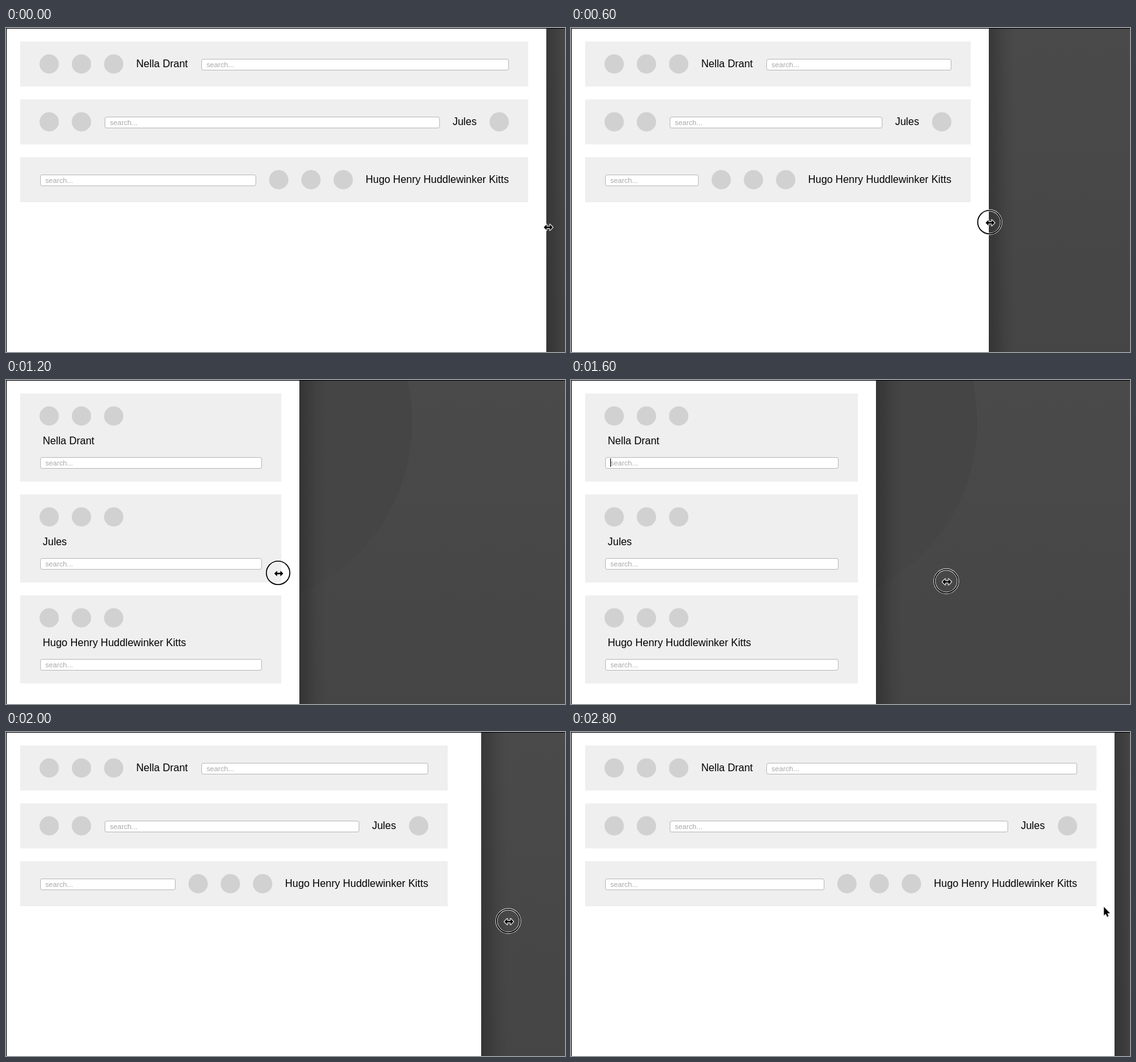
These frames come from a looping animation (867x504 px, 3 s). An HTML page:

```html
<!DOCTYPE html>
<html lang="en">
<head>
<meta charset="utf-8">
<title>Responsive toolbars</title>
<style>
  html, body { margin: 0; width: 100%; height: 100%; overflow: hidden; background: #484848; }
  svg { display: block; }
  .panel { fill: #efefef; }
  .dot { fill: #d1d1d1; }
  .field { fill: #fff; stroke: #bcbcbc; }
  .name { font: 16px "Liberation Sans", Arial, sans-serif; }
  .hint { font: 11.2px "Liberation Sans", Arial, sans-serif; fill: #a9a9a9; }
  .pointer { fill: #000; stroke: #fff; stroke-width: 2; paint-order: stroke; stroke-linejoin: round; }
  .ring { fill: none; stroke: #000; stroke-width: 1.6; }
  .halo { fill: none; stroke: #fff; stroke-width: 3.4; stroke-opacity: .8; }
</style>
</head>
<body>
<svg width="867" height="504" viewBox="0 0 867 504">
  <defs>
    <linearGradient id="desk" x2="0" y2="1">
      <stop stop-color="#4a4a4a"/><stop offset="1" stop-color="#454545"/>
    </linearGradient>
    <linearGradient id="shade">
      <stop stop-opacity=".24"/><stop offset=".3" stop-opacity=".16"/>
      <stop offset=".6" stop-opacity=".06"/><stop offset="1" stop-opacity="0"/>
    </linearGradient>
  </defs>
  <rect width="867" height="504" fill="url(#desk)"/>
  <circle cx="340" cy="66" r="290" fill="#454545"/>
  <rect id="shadow" width="42" height="504" fill="url(#shade)"/>
  <rect id="page" x="1" height="504" fill="#fff"/>
  <g id="panels"></g>
  <path d="M0 .5H867M.5 0V504" stroke="#000"/>
  <g id="cursor"></g>
</svg>
<script>
const STEP = 200, LOOP = 3000, NARROW = 500;
const NAMES = ['Nella Drant', 'Jules', 'Hugo Henry Huddlewinker Kitts'];

// Each step: window edge, cursor x, cursor y, how far the panels lag behind the edge
const STEPS = [
  [838, 840, 309], [838, 840, 309], [838, 829, 307], [648, 649, 302], [647, 646, 302],
  [645, 631, 301], [455, 422, 300], [421, 422, 301], [473, 582, 313], [676, 738, 304, 12],
  [737, 779, 294, 24], [780, 804, 293], [827, 843.5, 292], [842, 843.5, 292], [843, 826.5, 272]
];
const CARET_STEPS = [1, 2, 8, 9];
const RING_FIRST = 1, RING_LAST = 12, ARROW_STEP = 14;

const RESIZE = 'M-7 0L-2.5 -4.5V-1.2H2.5V-4.5L7 0L2.5 4.5V1.2H-2.5V4.5Z';
const ARROW = 'M0 0V13.5L3 10.7L5 15.5L7.3 14.5L5.3 9.9H9.5Z';

const el = id => document.getElementById(id);
const dots = (y, ...xs) => xs.map(x => `<circle class="dot" cx="${x + 15}" cy="${y + 35}" r="15"/>`).join('');
const label = (text, x, y, anchor = 'start') =>
  `<text class="name" x="${x}" y="${y}" text-anchor="${anchor}">${text}</text>`;

function field(left, right, y, caret) {
  return `<rect class="field" x="${left + .5}" y="${y + .5}" width="${right - left - 1}" height="17" rx="2.5"/>
    <text class="hint" x="${left + 8}" y="${y + 13}">search...</text>` +
    (caret ? `<rect x="${left + 8}" y="${y + 2}" width="1" height="13"/>` : '');
}

function narrowRow(i, y, end, caret) {
  return dots(y, 52, 102, 152) + label(NAMES[i], 57, y + 79) + field(53, end, y + 99, caret && i === 0);
}

function wideRow(i, y, end, caret) {
  const base = y + 40, top = y + 27;
  if (i === 0) return dots(y, 52, 102, 152) + label(NAMES[0], 202, base) + field(303, end, top, caret);
  if (i === 1) return dots(y, 52, 102, end - 30) + field(153, end - 107, top) + label(NAMES[1], end - 50, base, 'end');
  return field(53, end - 392, top) + dots(y, end - 372, end - 322, end - 272) + label(NAMES[2], end, base, 'end');
}

function drawPanels(edge, lag, caret) {
  const narrow = edge < NARROW, height = narrow ? 137 : 70, right = edge - 28 - lag;
  const row = narrow ? narrowRow : wideRow;
  return NAMES.map((_, i) => {
    const y = 21 + i * (height + 20);
    return `<rect class="panel" x="22" y="${y}" width="${right - 22}" height="${height}"/>` + row(i, y, right - 30, caret);
  }).join('');
}

function drawCursor(step) {
  if (step === ARROW_STEP) return `<path class="pointer" d="${ARROW}"/>`;
  const ring = step >= RING_FIRST && step <= RING_LAST
    ? '<circle class="halo" r="18.2"/><circle class="ring" r="18.2"/>' : '';
  return ring + `<path class="pointer" transform="translate(1 1)" d="${RESIZE}"/>`;
}

let shown = -1;
function render() {
  const step = Math.floor(performance.now() % LOOP / STEP);
  if (step !== shown) {
    shown = step;
    const [edge, x, y, lag = 0] = STEPS[step];
    el('page').setAttribute('width', edge - 1);
    el('shadow').setAttribute('x', edge);
    el('panels').innerHTML = drawPanels(edge, lag, CARET_STEPS.includes(step));
    el('cursor').setAttribute('transform', `translate(${x} ${y})`);
    el('cursor').innerHTML = drawCursor(step);
  }
  requestAnimationFrame(render);
}
render();
</script>
</body>
</html>
```
